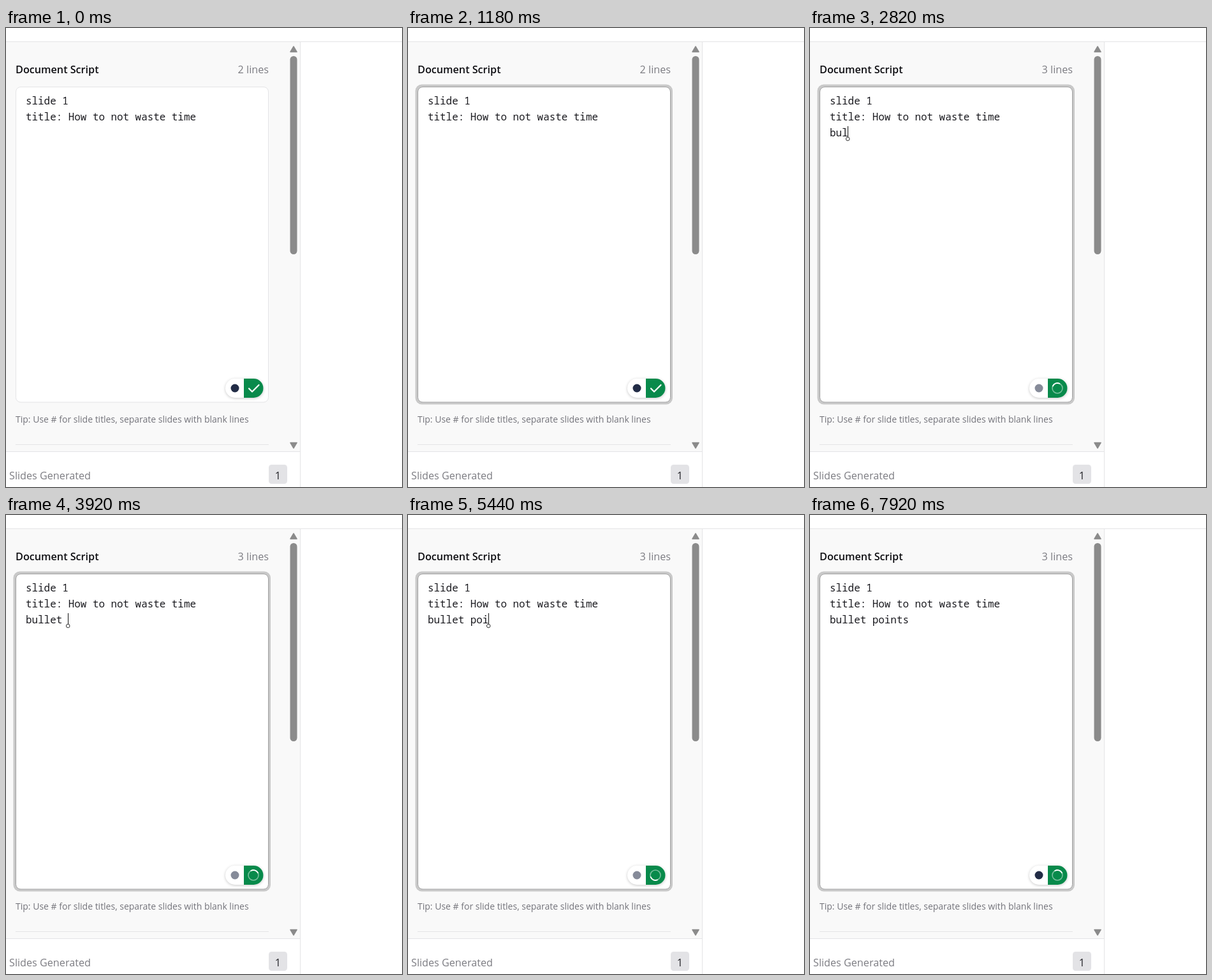
An HTML page that plays this animation: 621x720 px, repeating every 8 s.

```html
<!DOCTYPE html>
<html lang="en">
<head>
<meta charset="utf-8">
<title>Document Script</title>
<style>
  html, body { margin: 0; width: 100%; height: 100%; overflow: hidden; background: #fff; }
  svg { display: block; width: 621px; height: 720px; }
  text { font: 16.2px "Open Sans", "Noto Sans", sans-serif; fill: #7c7c82; white-space: pre; }
  .heading { font-weight: 600; fill: #0e0e12; }
  .tip { font-size: 14px; fill: #74747b; }
  .badge { font-weight: 500; fill: #232328; }
  .mono { font: 15.9px "Noto Sans Mono", "DejaVu Sans Mono", monospace; fill: #1b1b20; }
  .rule { fill: #e4e4e6; }
  .bar { fill: #8b8b8b; }
  .end { text-anchor: end; }
  .stroke { fill: none; stroke: #fff; stroke-linecap: round; stroke-linejoin: round; }
  .pill { filter: drop-shadow(0 1px 2px rgba(0, 0, 0, .22)); }
</style>
</head>
<body>
<svg viewBox="0 0 621 720">
  <rect width="621" height="720" fill="#fff"/>
  <rect y="22" width="461" height="642" fill="#f9f9f9"/>
  <rect class="rule" y="21" width="621" height="1"/>
  <rect class="rule" x="461" y="22" width="1" height="698"/>
  <rect class="rule" y="664" width="461" height="1"/>
  <rect class="rule" x="15" y="653" width="397" height="1"/>

  <rect class="bar" x="445.5" y="44" width="11" height="311" rx="5.5"/>
  <path class="bar" d="M446 37.5 L451 29 L456 37.5Z M446 650.5 L451 659 L456 650.5Z"
        stroke="#8b8b8b" stroke-width="1.5" stroke-linejoin="round"/>

  <text class="heading" x="15" y="71">Document Script</text>
  <text class="end" id="count" x="412" y="71"></text>

  <rect id="ring" x="11.5" y="88.5" width="403.5" height="502" rx="10" fill="#c9c9c9"/>
  <rect x="15.5" y="92.5" width="396" height="494.5" rx="7.5" fill="#fff" stroke="#e4e4e6"/>
  <rect id="edge" x="15.5" y="92.5" width="396" height="494.5" rx="7.5" fill="none" stroke="#a1a1a1"/>

  <text class="mono" x="31" y="120">slide 1</text>
  <text class="mono" x="31" y="145">title: How to not waste time</text>
  <text class="mono" id="typed" x="31" y="169.5"></text>
  <g id="caret">
    <rect width="1" height="18" fill="#111"/>
    <circle cx=".2" cy="20" r="2.8" fill="#fff" stroke="#333"/>
  </g>

  <g class="pill">
    <rect x="344" y="550" width="59.5" height="30" rx="15" fill="#fff"/>
    <path d="M373 550 H388.5 A15 15 0 0 1 388.5 580 H373Z" fill="#088a4b"/>
  </g>
  <circle id="dot" cx="359" cy="565" r="6.5" fill="#222c46"/>
  <path class="stroke" id="tick" d="M381 565.5 L386 570.5 L396.5 560" stroke-width="2.2"/>
  <g id="spinner">
    <circle class="stroke" cx="388" cy="565" r="8" stroke-width="1.6" opacity=".45"/>
    <path class="stroke" id="arc" d="M388 557 A8 8 0 0 1 396 565" stroke-width="1.8"/>
  </g>

  <text class="tip" x="15" y="619">Tip: Use # for slide titles, separate slides with blank lines</text>
  <text x="5" y="708">Slides Generated</text>
  <rect x="412" y="685" width="29" height="30" rx="4.5" fill="#e3e3e6"/>
  <text class="badge" x="426.5" y="708" text-anchor="middle">1</text>
</svg>
<script>
const LOOP = 8000, FOCUS = 620, ENTER = 1560, BLINK = 530;
const ADVANCE = 9.54, LEFT = 31, TITLE_LENGTH = 28;
const PHRASE = "bullet points";
const KEYS = [2060, 2360, 2660, 2960, 3200, 3440, 3700, 4300, 4750, 5150, 5550, 5780, 6000];
const $ = id => document.getElementById(id);
const ramp = (t, start, length) => Math.min(1, Math.max(0, (t - start) / length));
const show = (id, opacity) => $(id).setAttribute("opacity", opacity);
const move = (id, value) => $(id).setAttribute("transform", value);

function draw(t) {
  const length = KEYS.filter(key => key <= t).length;
  const newLine = t >= ENTER;
  const focus = 1 - (1 - ramp(t, FOCUS, 150)) ** 2;
  show("ring", focus);
  show("edge", focus);

  $("count").textContent = (newLine ? 3 : 2) + " lines";
  $("typed").textContent = PHRASE.slice(0, length);

  const lastAction = length ? KEYS[length - 1] : newLine ? ENTER : FOCUS;
  const lit = t >= FOCUS && Math.floor((t - lastAction) / BLINK) % 2 === 0;
  const column = newLine ? length : TITLE_LENGTH;
  show("caret", lit ? 1 : 0);
  move("caret", `translate(${Math.floor(LEFT + column * ADVANCE)} ${newLine ? 154 : 129.5})`);

  show("tick", newLine ? 0 : 1);
  show("spinner", newLine ? 1 : 0);
  show("dot", 1 - 0.45 * (ramp(t, ENTER, 150) - ramp(t, 7350, 200)));
  move("arc", `rotate(${t * 0.36 % 360} 388 565)`);
}

function tick() {
  draw(performance.now() % LOOP);
  requestAnimationFrame(tick);
}
draw(0);
requestAnimationFrame(tick);
</script>
</body>
</html>
```
